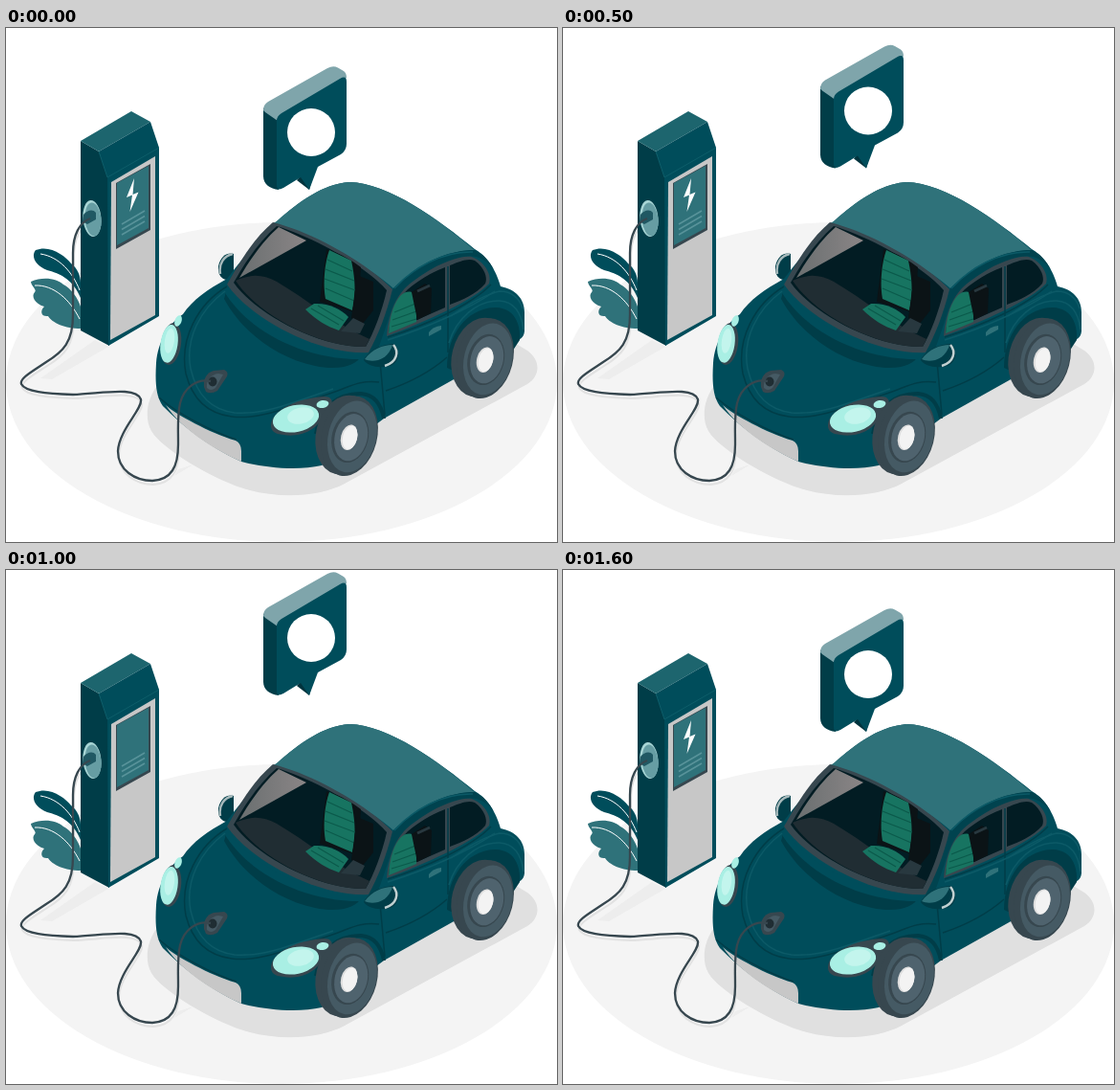
These frames come from a looping animation (576x537 px, 1.7 s). An HTML page:

```html
<!DOCTYPE html>
<html lang="en">
<head>
<meta charset="utf-8">
<title>Electric car charging</title>
<style>
  html, body { margin: 0; width: 100%; height: 100%; overflow: hidden; background: #fff; }
  svg { display: block; width: 576px; height: 537px; }
  .body { fill: #004d5b; }
  .deep { fill: #003d48; }
  .mid { fill: #2f727a; }
  .slate { fill: #37474f; }
  .night { fill: #021c23; }
  .black { fill: #0b1316; }
  .seat { fill: #177461; }
  .grey { fill: #c7c7c7; }
  .glow { fill: #a9efe4; }
  .shine { fill: #c3f5ed; }
  .line { fill: none; stroke: #003d48; stroke-width: 1.5; }
  .soft { fill: none; stroke: #0c5a67; stroke-width: 1.5; }
  .rib { fill: none; stroke: #0b5a4b; stroke-width: 1.3; }
  .vein { fill: none; stroke: #fff; stroke-width: 1; }
</style>
</head>
<body>
<svg viewBox="0 0 576 537">
  <defs>
    <linearGradient id="glass" x1="0" x2="1">
      <stop offset="0" stop-color="#6a6f70"/><stop offset="1" stop-color="#8a8586"/>
    </linearGradient>
    <g id="wheel">
      <ellipse cx="-4" rx="30" ry="42" class="slate"/>
      <ellipse cx="1" rx="29" ry="42.500" class="slate"/>
      <ellipse cx="4" rx="25" ry="38" fill="#455a64"/>
      <ellipse cx="2" cy="1" rx="19" ry="27" class="slate"/>
      <ellipse cx="3" cy="1" rx="17" ry="25" fill="#4f636e"/>
      <ellipse cx="1" cy="1.500" rx="8.500" ry="13.500" fill="#dedede"/>
      <ellipse cx="2" cy="1.500" rx="7.500" ry="12.500" fill="#f3f3f3"/>
    </g>
    <path id="cable" d="M88 199C77 203 70 216 70 235V300C70 328 60 338 42 349C27 359 14 366 16 372C20 380 42 382 70 383C100 382 136 374 141 388C143 398 118 420 117 442C117 462 135 473 153 473C173 472 180 458 180 435C180 415 179 405 182 392C186 376 199 366 214 369" fill="none"/>
  </defs>

  <!-- ground and shadows -->
  <ellipse cx="288" cy="370" rx="288" ry="167" fill="#f4f4f4"/>
  <path d="M93 326L107 333L48 367L36 366ZM180 461L196 456L176 468Z" fill="#ededed"/>
  <path d="M160 371C146 388 145 409 152 421C163 440 215 470 245 480C280 492 326 491 354 476L545 372C559 363 559 347 545 337L500 310Z" fill="#e0e0e0"/>
  <use href="#cable" x="1" y="4" stroke="#e2e2e2" stroke-width="2"/>

  <!-- plant -->
  <path d="M78 314C62 314 48 308 44 301C37 302 35 296 40 291C30 288 26 280 30 276C33 274 26 269 26 265C39 259 54 262 60 268C68 272 75 282 78 291Z" fill="#2f727a"/>
  <path d="M78 282C70 262 55 256 43 253C30 248 26 238 31 232C46 226 62 238 68 246C75 251 78 260 78 266Z" class="body"/>
  <path d="M36 236C56 239 70 256 77 274M30 269C50 268 67 284 77 304" class="vein"/>

  <!-- charging station -->
  <path d="M78 118L97 129L108 156V332L78 316Z" class="deep"/>
  <path d="M78 118L131 87L151 98L97 129Z" fill="#1d656e"/>
  <path d="M97 129L151 98L160 125V301L107 332L106 156Z" class="body"/>
  <path d="M97 129L106 156L160 125" fill="none" stroke="#0d5d69"/>
  <path d="M110 161L156 134V300L109 326Z" class="grey"/>
  <path d="M115 162L151 142V211L115 231Z" class="slate"/>
  <path d="M116 162L149 144V209L116 227Z" class="mid"/>
  <path d="M121 205L145 191M121 210.500L145 196.500M121 216L145 202" stroke="#58939a" stroke-width="1.500"/>
  <path id="bolt" d="M134 157L126 177L132 174.500L129.500 192L138.500 171.500L132.500 174Z" fill="#fff"/>
  <ellipse cx="90" cy="199" rx="9.500" ry="19" fill="#a8d5d5" transform="rotate(-5 90 199)"/>
  <ellipse cx="91" cy="200" rx="8.500" ry="17.500" fill="#669da3" transform="rotate(-5 91 200)"/>
  <path d="M81 195C85 190 91 189 94 193V200L85 205L80 202Z" fill="#205863"/>

  <!-- car body -->
  <g id="car">
    <path d="M238 262C227 266 221 259 222 249C224 238 232 234 238 236Z" class="deep"/>
    <path d="M224 257C222 246 228 238 237 236" fill="none" stroke="#a7b9bb" stroke-width="2.500"/>
    <path d="M283 202C307 181 331 163 359 161C400 162 452 200 490 231C504 239 512 253 517 270C533 273 542 283 542 297V317C541 324 537 326 531 327L470 366L395 408L330 457C304 463 268 459 246 453C209 436 183 414 164 395C156 384 156 367 157 350C159 327 170 309 185 299C195 284 211 273 231 262C249 239 264 219 283 202Z" class="body"/>
    <path d="M283 202C307 181 331 163 359 161C400 162 452 200 490 232C456 232 424 253 405 272C380 250 325 217 277 205Z" class="mid"/>
    <path d="M405 272C424 253 454 232 490 232C499 236 506 244 510 253C498 235 482 235 458 246C425 261 409 276 402 298L386 344L377 338Z" fill="#00434f"/>
    <path d="M406 272C425 251 456 233 488 234" class="soft"/>

    <!-- windscreen -->
    <path d="M279 203C323 214 379 247 404 273C398 298 389 321 379 339C328 342 257 305 231 268C246 241 260 219 279 203Z" class="slate"/>
    <path d="M283 207C323 219 376 249 398 274C393 296 385 317 376 333C328 334 262 300 238 266C252 241 266 222 283 207Z" class="night"/>
    <path d="M240 264C255 257 268 257 283 265C314 283 345 310 380 325L376 333C328 334 264 300 240 264Z" fill="#202d33"/>
    <path d="M285 208L314 222L244 261C255 242 269 222 285 208Z" fill="url(#glass)"/>
    <path d="M335 231C350 236 362 243 371 250L368 298L328 286Z" class="black"/>
    <path d="M338 232L361 243C365 261 366 279 362 295L334 283C331 267 333 246 338 232Z" class="seat"/>
    <path d="M336 242L362 254M334 252L364 264M333 262L365 274M334 272L364 285" class="rib"/>
    <path d="M313 294L322 288C336 287 350 293 358 302L348 316C336 312 324 305 313 294Z" class="seat"/>
    <path d="M319 293L348 310M326 290L353 306" class="rib"/>
    <path d="M367 258L384 265V295L372 310L361 303Z" class="black"/>
    <path d="M363 303L375 309L370 319L350 317Z" fill="#28383f"/>

    <!-- side windows -->
    <path d="M398 322C400 299 407 278 425 265C447 248 473 237 487 239C500 244 508 257 505 267C491 283 439 307 398 322Z" class="slate"/>
    <path d="M400 318C403 296 410 280 425 269C437 260 448 254 459 250V292Z" class="night"/>
    <path d="M464 248C474 244 483 240 490 243C499 249 504 260 501 267C491 278 478 284 464 289Z" class="night"/>
    <path d="M400 319C401 300 406 286 413 279C420 273 428 275 429 283V307Z" class="seat"/>
    <path d="M406 297L428 288M404 305L429 296M403 312L429 304" class="rib"/>
    <path d="M424 276L438 267L445 272L444 298L430 305Z" class="black"/>
    <path d="M430 275L443 269" stroke="#28383f" stroke-width="3"/>
    <path d="M462 249V339M399 323C437 311 486 290 507 268M391 348L396 404M397 379C421 371 445 358 461 344" class="line"/>
    <path d="M399 326C440 313 484 294 511 275" class="soft"/>
    <path d="M442 318Q446 312 455 311V315L442 322Z" fill="#2f727a"/>

    <!-- bonnet -->
    <path d="M231 272C251 307 305 340 372 341C367 354 346 358 323 353C281 344 246 316 228 283Z" class="deep"/>
    <path d="M231 268C247 301 306 338 376 340L370 346C307 346 251 314 228 275Z" class="body"/>
    <path d="M231 270C201 288 181 324 188 361C195 389 212 403 236 406C266 410 304 393 341 381C357 376 370 367 390 370" class="line"/>
    <path d="M229 275C203 294 187 325 193 356C200 386 216 399 239 402C270 405 309 388 342 377" class="soft"/>
    <path d="M324 424C328 397 345 382 371 382C385 383 392 392 395 408" fill="none" stroke="#003d48" stroke-width="4"/>
    <path d="M167 394C178 404 213 423 240 431Q246 434 246 442V453C214 439 182 417 167 394Z" class="grey"/>
    <path d="M160 386C178 402 215 422 241 430" class="line"/>

    <!-- headlights -->
    <g transform="rotate(8 172 330)">
      <ellipse cx="172.500" cy="330" rx="10.500" ry="22" class="slate"/>
      <ellipse cx="170.500" cy="330" rx="9" ry="20" class="glow"/>
      <ellipse cx="170.500" cy="327" rx="5" ry="13" class="shine"/>
    </g>
    <ellipse cx="180" cy="306" rx="3.500" ry="6" class="glow" transform="rotate(20 180 306)"/>
    <path d="M277 414C279 399 304 387 332 385C345 384 342 398 333 403C326 421 306 428 290 425Q276 424 277 414Z" class="slate"/>
    <ellipse cx="303" cy="408" rx="24.500" ry="14" class="glow" transform="rotate(-12 303 408)"/>
    <ellipse cx="308" cy="405" rx="14" ry="8.500" class="shine" transform="rotate(-12 308 405)"/>
    <ellipse cx="331" cy="393" rx="6.500" ry="4" class="glow" transform="rotate(-10 331 393)"/>

    <!-- wing mirror -->
    <path d="M374 347C378 337 393 330 406 330C413 337 411 349 402 353C389 356 378 353 374 347Z" class="deep"/>
    <path d="M375 346C382 336 394 331 404 331C402 339 396 345 389 347C384 348 379 348 375 346Z" class="mid"/>
    <path d="M405 331C411 338 409 349 396 353" fill="none" stroke="#c2d0d1" stroke-width="2.500"/>

    <!-- wheels -->
    <path d="M461 355C461 319 483 292 513 292C530 293 538 307 537 326L505 375Z" class="deep"/>
    <path d="M463 329C471 303 493 284 516 285C533 286 539 300 541 315" class="soft"/>
    <path d="M465 301C481 290 499 279 516 275C529 275 537 283 540 293" class="soft"/>
    <use href="#wheel" transform="translate(500 345) rotate(14)"/>
    <use href="#wheel" transform="translate(358 426) rotate(14)"/>
  </g>

  <!-- socket and cable -->
  <path d="M207 375C206 366 210 360 217 358L228 357Q233 359 231 364L221 379Q214 383 209 380Z" class="slate"/>
  <path d="M210 376C209 368 214 362 222 361L227 362L219 376Q214 380 210 376Z" fill="#455a64"/>
  <ellipse cx="216" cy="369.500" rx="4.500" ry="5" fill="#1f2d33"/>
  <use href="#cable" stroke="#37474f" stroke-width="2.300"/>

  <!-- speech bubble -->
  <g id="bubble">
    <path d="M269 84L278 79L289 94L285 169C276 168 269 163 269 155Z" class="deep"/>
    <path d="M269 86Q269 80 274 77L336 42Q342 39 347 41.500L353 45Q356 47 356 52L352 54L289 91L284 97L271 88Z" fill="#7fa5ab"/>
    <path d="M304 159L311 151L320 158L317 169Z" fill="#00333d"/>
    <path d="M283 97Q283 92 288 89L349 53Q356 49 356 56V121Q356 128 350 132L326 145L317 169L308 156L290 167Q283 171 283 164Z" class="body"/>
    <circle cx="319" cy="109" r="25" fill="#fff"/>
  </g>
</svg>
<script>
  const LOOP = 1700, STEP = 100;
  const bubble = document.getElementById("bubble");
  const bolt = document.getElementById("bolt");

  // Steady rise, slightly faster fall, then a snap back to rest.
  function lift(step) {
    if (step < 10) return 4.5 * step;
    return step < 16 ? 88 - 5 * step : 0;
  }

  function draw(now) {
    const step = Math.floor(now % LOOP / STEP);
    bubble.setAttribute("transform", `translate(0 ${-lift(step)})`);
    bolt.setAttribute("visibility", step % 4 < 2 ? "visible" : "hidden");
    requestAnimationFrame(draw);
  }
  draw(0);
</script>
</body>
</html>
```
